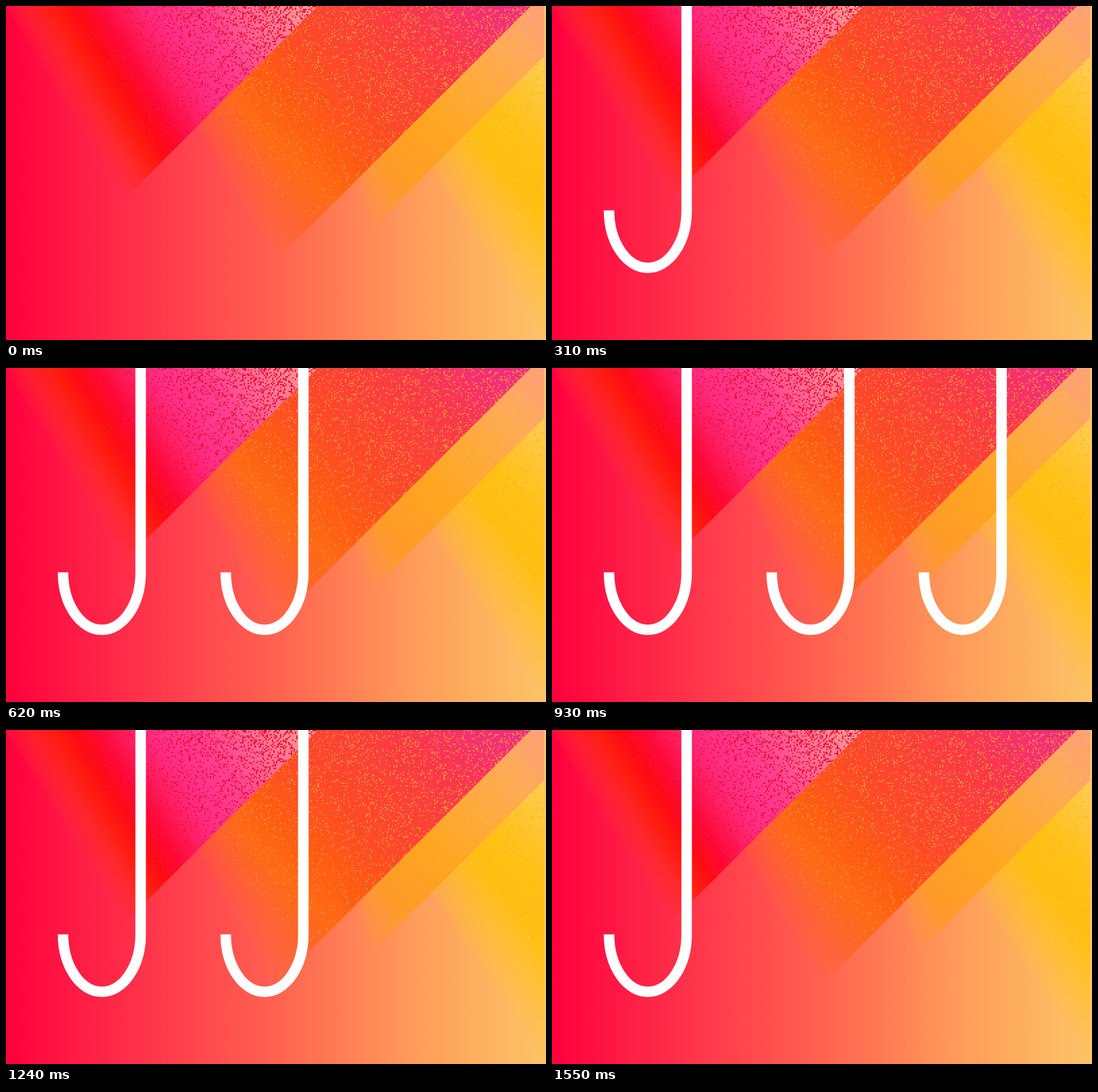
These frames come from a looping animation (800 px wide and 496 px high, 1860 ms). An HTML page with a canvas:

```html
<!DOCTYPE html>
<html lang="en">
<head>
<meta charset="utf-8">
<title>Hooks</title>
<style>
html, body { margin: 0; width: 100%; height: 100%; overflow: hidden; background: #ff4b4f; }
canvas { display: block; width: 800px; height: 496px; }
</style>
</head>
<body>
<canvas id="stage" width="800" height="496"></canvas>
<script>
const W = 800, H = 496, STEP = 310, COUNTS = [0, 1, 2, 3, 2, 1];
const HOOKS = [0, 241, 466.5];
const ctx = document.getElementById('stage').getContext('2d');

function sheet() {
  const c = document.createElement('canvas');
  c.width = W;
  c.height = H;
  return c;
}

function seeded(seed) {
  return () => {
    seed = (seed + 0x6d2b79f5) | 0;
    let t = Math.imul(seed ^ (seed >>> 15), 1 | seed);
    t = (t + Math.imul(t ^ (t >>> 7), 61 | t)) ^ t;
    return ((t ^ (t >>> 14)) >>> 0) / 4294967296;
  };
}

// Gradient along unit vector n; stops are [distance, colour].
function ramp(g, n, stops, ox = 0, oy = 0) {
  const a = stops[0][0], b = stops[stops.length - 1][0];
  const grad = g.createLinearGradient(ox + n[0] * a, oy + n[1] * a, ox + n[0] * b, oy + n[1] * b);
  for (const [d, color] of stops) grad.addColorStop((d - a) / (b - a), color);
  return grad;
}

const DIAG = [Math.SQRT1_2, -Math.SQRT1_2];

// side: foot and head of the soft left boundary; grain: start, end, low and high density.
const BANDS = [
  {
    shape: [[0, 0], [462, 0], [178, 284]],
    side: [[178, 284], [0, 0]], fade: 58, dir: [0.847, -0.531],
    stops: [[0, '#ff2a38'], [30, '#ff2822'], [58, '#ff1c10'], [85, '#ff0a14'], [115, '#ff0838'],
            [150, '#ff1e62'], [182, '#ff2c84'], [245, '#ff4090'], [300, '#ff6892'], [375, '#ff9890']],
    grain: [75, 330, 0.03, 0.27], dots: ['#ee1040', '#f41430', '#ec1c50']
  },
  {
    shape: [[462, 0], [778, 0], [402, 376], [285, 177]],
    side: [[402, 376], [285, 177]], fade: 75, dir: DIAG,
    stops: [[15, '#ff6638'], [75, '#ff642c'], [140, '#ff6a14'], [185, '#ff5e10'],
            [270, '#ff4a26'], [350, '#ff4038'], [420, '#fc364e'], [480, '#f63070'], [550, '#ec2a8c']],
    grain: [90, 530, 0.05, 0.19], dots: ['#ff7c38', '#f88a34', '#f47a40']
  },
  {
    shape: [[778, 0], [797, 0], [797, 75], [543, 329], [518, 260]],
    side: [[543, 329], [518, 260]], fade: 45, dir: DIAG,
    stops: [[150, '#ff9444'], [235, '#ff9c28'], [320, '#ffa520'], [400, '#ffaa38'],
            [480, '#ffaa58'], [560, '#ff9c84']],
    grain: [340, 560, 0, 0.2], dots: ['#ffb43c', '#ffae50']
  },
  {
    shape: [[797, 75], [797, 490], [632, 240]],
    side: [[797, 490], [632, 240]], fade: 85, dir: DIAG,
    stops: [[215, '#fec04c'], [290, '#ffc028'], [350, '#ffbe10'], [410, '#ffc016'],
            [460, '#ffc636'], [515, '#ffce58']],
    grain: [260, 500, 0.02, 0.08], dots: ['#ffb820', '#ffc848']
  }
];

function paintBand(band, seed) {
  const c = sheet(), g = c.getContext('2d'), rand = seeded(seed);
  g.beginPath();
  band.shape.forEach(([x, y]) => g.lineTo(x, y));
  g.closePath();
  g.clip();
  g.fillStyle = ramp(g, band.dir, band.stops);
  g.fillRect(0, 0, W, H);

  const [from, to, low, high] = band.grain;
  for (let y = 0; y < H; y += 2) {
    for (let x = 0; x < W; x += 2) {
      const k = (x * band.dir[0] + y * band.dir[1] - from) / (to - from);
      if (k < 0 || rand() > low + (high - low) * Math.min(k, 1)) continue;
      g.fillStyle = band.dots[Math.floor(rand() * band.dots.length)];
      g.fillRect(x, y, 2, 2);
    }
  }

  const [[x0, y0], [x1, y1]] = band.side;
  const len = Math.hypot(x1 - x0, y1 - y0);
  const normal = [(y0 - y1) / len, (x1 - x0) / len];
  const f = band.fade;
  g.globalCompositeOperation = 'destination-in';
  g.fillStyle = ramp(g, normal, [[0, 'rgba(0,0,0,0.2)'], [f * 0.5, 'rgba(0,0,0,0.68)'], [f, '#000']], x0, y0);
  g.fillRect(0, 0, W, H);
  return c;
}

function paintBackdrop() {
  const c = sheet(), g = c.getContext('2d');
  g.fillStyle = ramp(g, [1, 0], [
    [0, '#ff003c'], [100, '#ff1a44'], [200, '#ff324a'], [300, '#ff4a4e'], [400, '#ff6250'],
    [500, '#ff7e54'], [600, '#ff9a5a'], [700, '#fdb05e'], [800, '#fcc468']
  ]);
  g.fillRect(0, 0, W, H);
  BANDS.forEach((band, i) => g.drawImage(paintBand(band, 17 + i * 101), 0, 0));
  return c;
}

function hook(dx) {
  ctx.beginPath();
  ctx.moveTo(199.5 + dx, -10);
  ctx.lineTo(199.5 + dx, 303.5);
  ctx.ellipse(142 + dx, 303.5, 57.5, 85.2, 0, 0, Math.PI);
  ctx.stroke();
}

const backdrop = paintBackdrop();
ctx.strokeStyle = '#fff';
ctx.lineWidth = 15.6;
const start = performance.now();

function draw() {
  const t = Math.max(0, performance.now() - start);
  ctx.drawImage(backdrop, 0, 0);
  HOOKS.slice(0, COUNTS[Math.floor(t / STEP) % COUNTS.length]).forEach(hook);
  requestAnimationFrame(draw);
}
draw();
</script>
</body>
</html>
```
